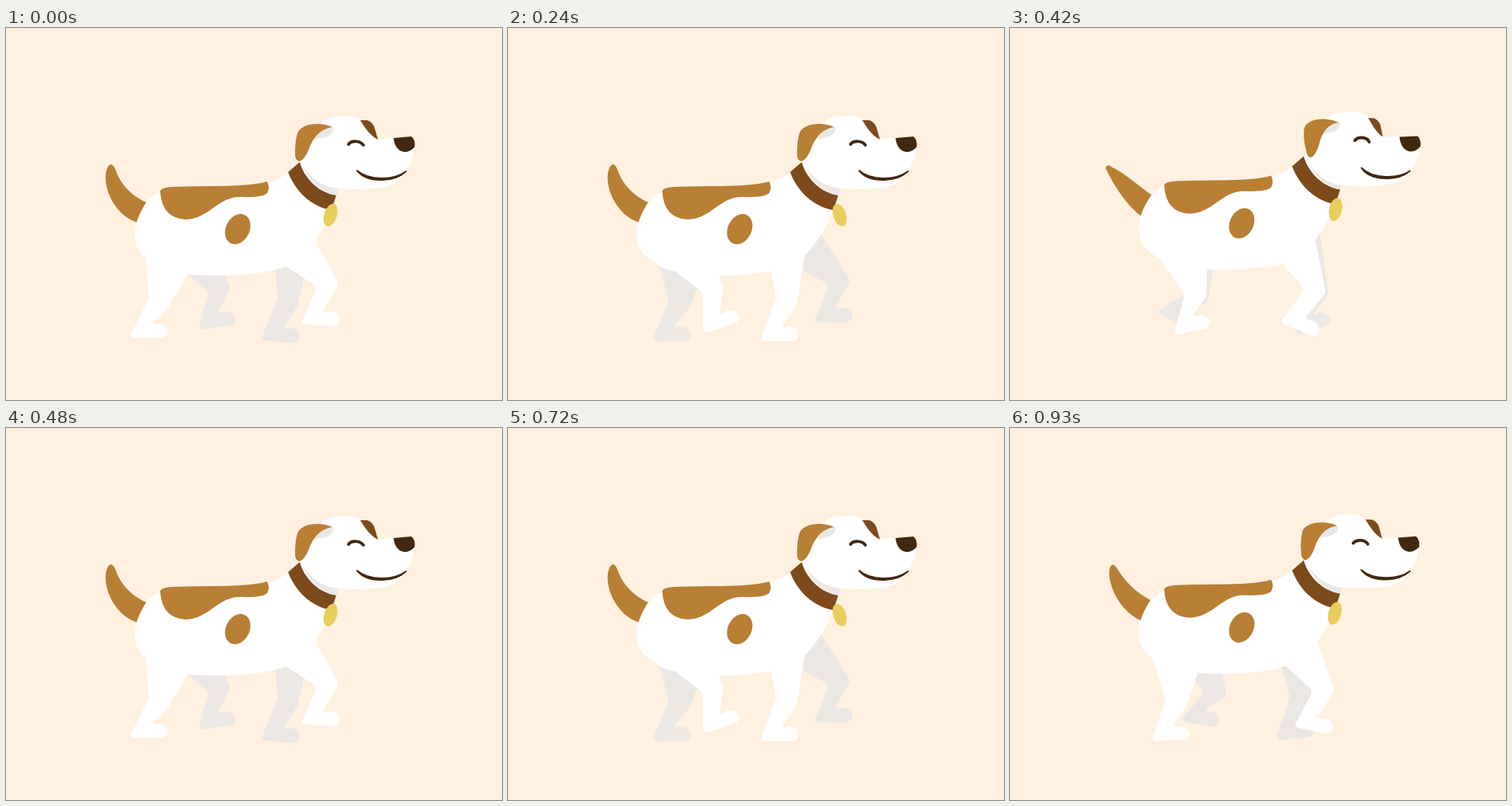
These frames come from a looping animation (640 by 480 pixels, 960 ms). An HTML page with a canvas:

```html
<!DOCTYPE html>
<html lang="en">
<head>
<meta charset="utf-8">
<title>Walking dog</title>
<style>
html, body { margin: 0; width: 100%; height: 100%; overflow: hidden; background: #fff0e0; }
canvas { display: block; }
</style>
</head>
<body>
<canvas id="stage" width="640" height="480"></canvas>
<script>
const ctx = document.getElementById('stage').getContext('2d');
const STEP = 30, STRIDE = 480, BOB = 15, TAU = 2 * Math.PI;
const SKY = '#fff0e0', WHITE = '#fff', SHADE = '#ebe7e5', TAN = '#b87f35', BROWN = '#7d4a1b', DARK = '#42280f', GOLD = '#e8cd5b';

// Steps hold time, heel x, heel y and foot angle in degrees.
const hind = {
  hip: [215, 285], thigh: 72, shin: 40, back: [-35, 2], front: [40, -3],
  steps: [[0, 159, 400, 0], [120, 149, 360, 38], [240, 252, 394, -17], [360, 259, 383, -32], [450, 182, 404, -2]]
};
const fore = {
  hip: [366, 283], thigh: 70, shin: 43, back: [-30, 9], front: [23, -26],
  steps: [[0, 380, 382, 3], [120, 416, 377, -36], [240, 325, 404, 0], [360, 320, 371, 39], [450, 366, 386, 11]]
};
// Foot outline from its heel: x, y, corner radius.
const foot = [[0, 0, 4], [50, 0, 8], [50, -20, 11], [27, -17, 2]];

// Smooth cyclic interpolation through the steps.
function stepAt(steps, t) {
  const n = steps.length;
  const key = j => steps[(j + n) % n];
  const time = j => key(j)[0] + STRIDE * Math.floor(j / n);
  let i = n - 1;
  while (time(i) > t) i--;
  const span = time(i + 1) - time(i), u = (t - time(i)) / span;
  return [1, 2, 3].map(k => {
    const slope = j => (key(j + 1)[k] - key(j - 1)[k]) / (time(j + 1) - time(j - 1)) * span;
    const a = key(i)[k], b = key(i + 1)[k], d = slope(i), e = slope(i + 1);
    return a + u * (d + u * (3 * (b - a) - 2 * d - e + u * (2 * (a - b) + d + e)));
  });
}

// Places the foot, then bends the knee forward to reach it from the hip.
function drawLeg({ hip, thigh, shin, back, front, steps }, color, t, lift, shift = 0) {
  const [heelX, heelY, degrees] = stepAt(steps, t % STRIDE);
  const turn = degrees * TAU / 360, c = Math.cos(turn), s = Math.sin(turn);
  const onFoot = ([x, y, r]) => [heelX + shift + x * c - y * s, heelY + x * s + y * c, r];

  const hipX = hip[0] + shift, hipY = hip[1] - BOB * lift;
  const [ankleX, ankleY] = onFoot([13, -14]);
  const dx = ankleX - hipX, dy = ankleY - hipY, reach = Math.hypot(dx, dy);
  const bend = Math.acos(Math.min(1, (thigh ** 2 + reach ** 2 - shin ** 2) / (2 * thigh * reach)));
  const upper = Math.atan2(dy, dx) - bend;
  const kneeX = hipX + thigh * Math.cos(upper), kneeY = hipY + thigh * Math.sin(upper);
  const lower = Math.atan2(ankleY - kneeY, ankleX - kneeX);
  const across = (upper + lower) / 2 - TAU / 4;
  const knee = w => [kneeX + w * Math.cos(across), kneeY + w * Math.sin(across), 9];

  const outline = [knee(-14), ...foot.map(onFoot), knee(14), [hipX + front[0], hipY + front[1]]];
  ctx.beginPath();
  ctx.moveTo(hipX + back[0], hipY + back[1]);
  outline.forEach(([x, y, r], i) => {
    const next = outline[i + 1];
    if (next) ctx.arcTo(x, y, next[0], next[1], r);
    else ctx.lineTo(x, y);
  });
  ctx.fillStyle = color;
  ctx.fill();
}

function fill(color, path) {
  ctx.fillStyle = color;
  ctx.fill(new Path2D(path));
}

function stroke(width, path) {
  ctx.strokeStyle = DARK;
  ctx.lineWidth = width;
  ctx.lineCap = ctx.lineJoin = 'round';
  ctx.stroke(new Path2D(path));
}

function oval(color, x, y, rx, ry, angle) {
  ctx.beginPath();
  ctx.ellipse(x, y, rx, ry, angle, 0, TAU);
  ctx.fillStyle = color;
  ctx.fill();
}

// Blends the lowered and the raised shape of a part.
function mix(low, high, lift) {
  const ends = high.match(/\d+/g);
  let i = 0;
  return low.replace(/\d+/g, v => (+v + (ends[i++] - v) * lift).toFixed(2));
}

function raised(lift, draw) {
  ctx.save();
  ctx.translate(0, -BOB * lift);
  draw();
  ctx.restore();
}

function drawTail(lift) {
  fill(TAN, mix(
    'M183 226C160 216 147 200 141 182Q136 171 131 180C122 200 138 242 170 251L200 251Z',
    'M185 207C170 190 148 174 122 177Q113 178 116 182C138 190 154 208 169 235L200 235Z', lift));
}

function drawBody() {
  fill(WHITE, 'M364 186C345 203 320 204 280 204L240 204C208 205 190 212 179 228C170 243 166 255 166 267C167 283 172 291 180 296L200 310L232 318C275 321 328 320 360 308L386 291C400 276 412 253 421 234L426 216L380 173Z');
}

function drawMarkings() {
  fill(TAN, 'M199 211Q199 206 215 205C260 203 310 206 337 198Q341 206 337 213Q331 219 304 218C274 216 262 247 231 247Q201 245 199 211Z');
  oval(TAN, 299, 259.5, 15.3, 20.5, 0.46);
}

function drawHead(lift) {
  const part = (color, low, high) => fill(color, mix(low, high, lift));
  part(SHADE,
    'M383 176C392 200 410 214 427 216L429 206Z',
    'M383 161C391 182 408 197 424 200L427 198Z');
  part(BROWN,
    'M455 119L466 119Q472 121 475 127L480 144L470 142Z',
    'M467 113L474 114Q480 118 481 124L482 137L472 136Z');
  part(WHITE,
    'M380 172C385 145 397 120 425 114C439 112 452 113 457 119C462 126 468 138 480 144L501 141L527 153C525 172 517 187 506 197C493 209 455 209 430 207C405 206 388 188 380 172Z',
    'M382 158C390 135 400 110 425 104C440 101 460 102 467 113C471 119 475 131 482 137L505 139L532 151C528 168 523 181 512 190C495 202 455 202 428 199C406 196 390 178 382 158Z');
  part(SHADE,
    'M422 128C405 130 400 135 396 143C410 144 425 138 422 128Z',
    'M428 116C414 117 411 123 408 130C420 129 432 126 428 116Z');
  part(TAN,
    'M376 136Q378 130 385 127C395 122 412 123 421 128C405 130 396 142 391 156Q386 169 379 172Q372 171 373 160Q373 147 376 136Z',
    'M383 124Q384 118 391 114C400 109 418 111 428 116C414 117 409 130 407 143Q404 158 399 162Q394 163 391 155Q383 138 383 124Z');
  part(DARK,
    'M500 142L523 140Q529 145 527 154Q521 160 514 160Q502 158 500 142Z',
    'M505 139L529 139Q533 144 532 152Q527 159 519 159Q507 157 505 139Z');
  stroke(4, mix('M442 150C446 145 457 145 461 151', 'M448 140C453 134 464 136 466 143', lift));
  const smile = mix(
    'M453 184C465 200 500 200 516 185C500 197 468 197 453 184Z',
    'M454 177C465 196 500 196 516 184C500 193 468 193 454 177Z', lift);
  fill(DARK, smile);
  stroke(2, smile);
}

function drawCollar(t) {
  fill(BROWN, 'M379 173C385 195 405 213 426 216L420 235C395 231 374 212 364 186Z');
  const swing = 0.31 * Math.cos(TAU * t / STRIDE);
  oval(GOLD, 423.3 - 15 * Math.sin(swing), 227 + 15 * Math.cos(swing), 8.3, 15, swing);
}

function draw(now) {
  const t = Math.floor(now % STRIDE / STEP) * STEP;
  const lift = 0.5 - 0.5 * Math.cos(2 * TAU * t / STRIDE);
  ctx.fillStyle = SKY;
  ctx.fillRect(0, 0, 640, 480);
  drawLeg(hind, SHADE, t + 218, lift, 11);
  drawLeg(fore, SHADE, t + 255, lift, 9);
  drawTail(lift);
  raised(lift, drawBody);
  drawLeg(hind, WHITE, t, lift);
  drawLeg(fore, WHITE, t, lift);
  raised(lift, drawMarkings);
  drawHead(lift);
  raised(lift, () => drawCollar(t));
}

let start;
function tick(now) {
  start ??= now;
  draw(now - start);
  requestAnimationFrame(tick);
}
draw(0);
requestAnimationFrame(tick);
</script>
</body>
</html>
```
